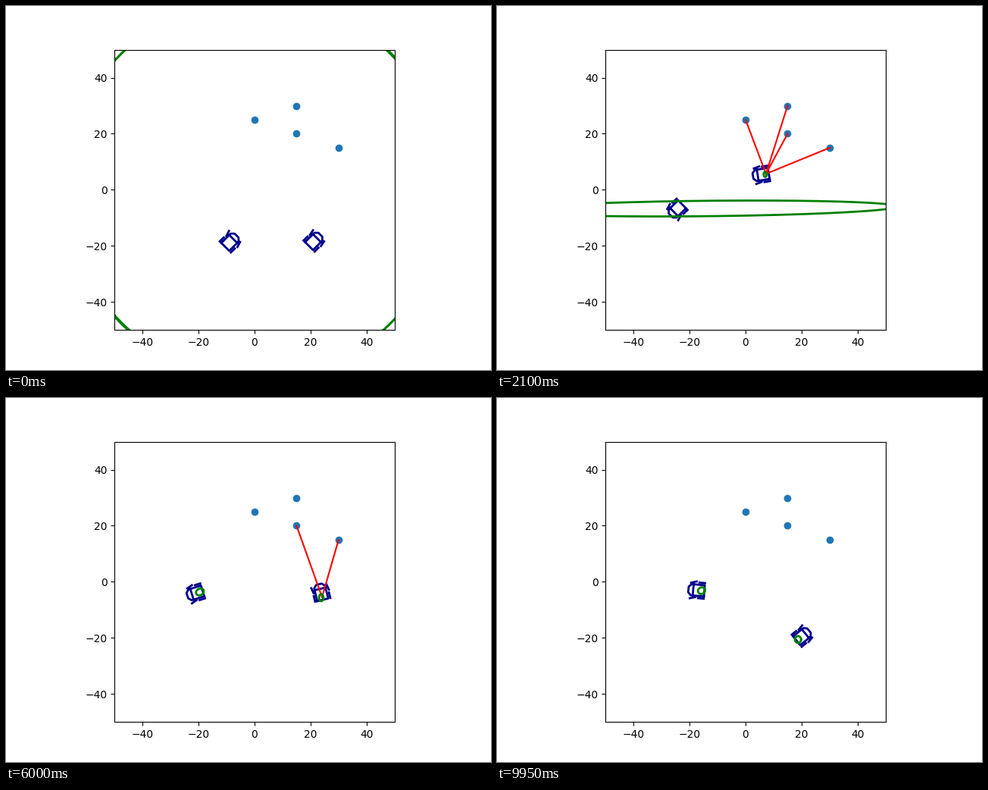
A matplotlib script for the animation above (10000 ms loop, 640 px wide and 480 px high).

```python
import numpy as np
import matplotlib.pyplot as plt
from matplotlib.animation import FuncAnimation

FRAMES, STEP_MS = 200, 50
LANDMARK_RANGE, PEER_RANGE = 30.2, 29.5
AXLE, TRACK, WHEEL = 3.0, 2.8, 1.0
UNKNOWN = 68
LANDMARKS = np.array([(0, 25), (15, 30), (15, 20), (30, 15)])
GAP = [[np.nan, np.nan]]


def rotate(points, deg):
    a = np.radians(deg)
    c, s = np.cos(a), np.sin(a)
    return np.asarray(points) @ np.array([[c, s], [-s, c]])


def cosd(deg):
    return np.cos(np.radians(deg))


def ellipse(center, a, b, tilt=0):
    u = np.linspace(0, 2 * np.pi, 200)
    return rotate(np.column_stack([a * np.cos(u), b * np.sin(u)]), tilt) + center


def car_shape(steer):
    """Outline with the middle of the rear axle at the origin, facing +x."""
    box = [(-1, 2), (3, 2), (3, -2), (-1, -2), (-1, 2)]
    nose = [(3, 2), (3.7, 2), (4.7, 1), (4.7, -1), (3.7, -2), (3, -2)]
    wheel = [(-WHEEL, 0), (WHEEL, 0)]
    parts = [box, GAP, nose]
    for x, turn in ((0, 0), (AXLE, steer)):
        for y in (TRACK, -TRACK):
            parts += [GAP, rotate(wheel, turn) + (x, y)]
    return np.vstack(parts)


class Robot:
    """Car on a circle; its turn rate may grow slowly."""

    def __init__(self, center, radius, rate, gain=0):
        self.center, self.radius = np.array(center), radius
        self.rate, self.gain = rate, gain
        self.shape = car_shape(np.degrees(np.arctan(AXLE / radius)))

    def pose(self, t):
        deg = 45 + self.rate * t + self.gain * t ** 3
        return self.center + rotate([0, -self.radius], deg), deg

    def moved(self, t):
        return self.pose(t)[0] - self.pose(0)[0]


fast = Robot((9.7, -8.9), 14.8, rate=68.6, gain=0.032)
slow = Robot((-16.6, -12.8), 9.7, rate=85.4)


def fast_estimate(t):
    pos, deg = fast.pose(t)
    if t < 0.35:
        return ellipse(fast.moved(t) + 0.65, UNKNOWN, UNKNOWN)
    if t < 0.65:
        return ellipse(pos + (-19, 13), UNKNOWN, 2.6, 116)
    # Uncertainty follows which landmarks are near along the circle.
    return ellipse(pos + (-0.3, -0.2),
                   0.85 + 0.3 * cosd(deg), 1 + 0.3 * cosd(deg - 80))


def slow_estimate(t):
    pos, _ = slow.pose(t)
    if t < 1.0:
        return ellipse(slow.moved(t) + 0.4, UNKNOWN, UNKNOWN)
    if t < 2.6:
        return ellipse(pos + (9.3, -0.8), UNKNOWN, 2.75, 0.6)
    left = np.exp((2.95 - t) / 0.9)
    return ellipse(pos + left * np.array([-0.9, -2.2]),
                   1.3 + 4 * left, 1.15, 28)


def sight_lines(a, b):
    pairs = [(p, m, LANDMARK_RANGE) for p in (a, b) for m in LANDMARKS]
    pairs.append((a, b, PEER_RANGE))
    seen = [np.vstack([p, q, GAP]) for p, q, reach in pairs
            if np.hypot(*(p - q)) < reach]
    return np.vstack(seen or [GAP])


fig, ax = plt.subplots(figsize=(6.4, 4.8), dpi=100)
ax.set_aspect("equal")
ax.set_xlim(-50, 50)
ax.set_ylim(-50, 50)
ax.set_xticks(range(-40, 41, 20))
ax.set_yticks(range(-40, 41, 20))
ax.scatter(*LANDMARKS.T)

cars = [ax.plot([], [], color="darkblue", lw=2)[0] for _ in range(2)]
rays, = ax.plot([], [], color="red", lw=1.5)
rings = [ax.plot([], [], color="green", lw=2)[0] for _ in range(2)]


def draw(i):
    t = i * STEP_MS / 1000
    spots = []
    for robot, car in zip((fast, slow), cars):
        pos, deg = robot.pose(t)
        car.set_data(*(rotate(robot.shape, deg) + pos).T)
        spots.append(pos)
    for ring, estimate in zip(rings, (fast_estimate, slow_estimate)):
        ring.set_data(*estimate(t).T)
    rays.set_data(*sight_lines(*spots).T)
    return [*cars, rays, *rings]


anim = FuncAnimation(fig, draw, frames=FRAMES, interval=STEP_MS,
                     repeat=True, repeat_delay=0)
plt.show()
```
